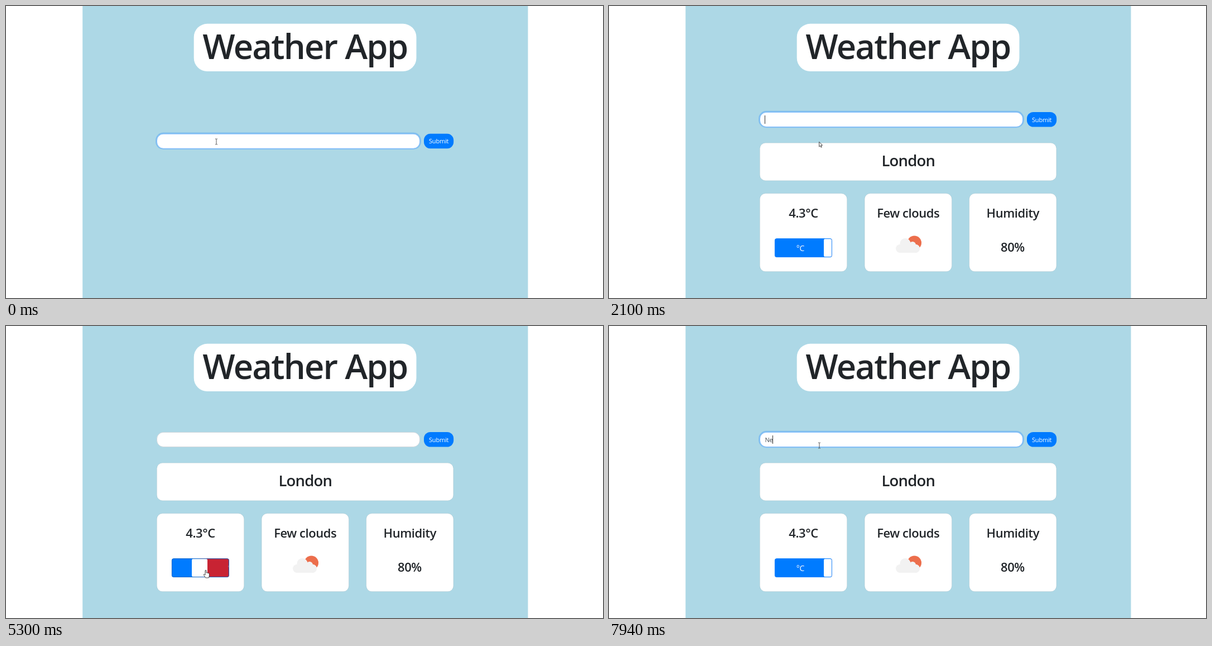
These frames come from a looping animation (1070x523 px, 7.99 s). An HTML page:

```html
<!DOCTYPE html>
<html lang="en">
<head>
<meta charset="utf-8">
<title>Weather App</title>
<style>
  html, body { margin: 0; width: 100%; height: 100%; overflow: hidden; background: #fff; }
  svg { display: block; width: 100vw; height: 100vh; }
  text { font-family: "Open Sans", "Noto Sans", sans-serif; fill: #212529; letter-spacing: -.02em; }
  .mid { text-anchor: middle; }
  .head { font-size: 22px; font-weight: 600; text-anchor: middle; }
  .light { fill: #fff; font-weight: 500; }
  .card { fill: #fff; stroke: #000; stroke-opacity: .1; stroke-width: .7; }
  .cursor { fill: #fff; stroke: #333; stroke-width: .9; stroke-linejoin: round; }
</style>
</head>
<body>
<svg viewBox="0 0 1070 523">
  <defs>
    <clipPath id="pill"><rect x="297.3" y="416.5" width="102.4" height="33.3" rx="3"/></clipPath>
  </defs>

  <rect x="137.2" width="798.3" height="523" fill="#add8e6"/>
  <rect x="336.7" y="31.8" width="398.8" height="85.2" rx="24" fill="#fff"/>
  <text class="mid" x="536" y="95" font-size="61.5" font-weight="600" style="letter-spacing:-.029em">Weather App</text>

  <g id="form">
    <rect id="ring" x="268" y="187.8" width="476" height="30.4" rx="14" fill="#82bfee"/>
    <rect id="field" x="270.5" y="190.4" width="471" height="26" rx="11.5" fill="#fff" stroke-width=".9"/>
    <text id="typed" x="279.5" y="208" font-size="11" style="fill:#495057;letter-spacing:-.03em"></text>
    <rect id="caret" y="196" width="1" height="15" fill="#333"/>
    <rect x="749" y="190" width="53.2" height="26.5" rx="11.5" fill="#007bff"/>
    <text class="mid light" x="775.6" y="207.6" font-size="11">Submit</text>
  </g>

  <g id="results">
    <rect class="card" x="270.4" y="245.3" width="531.4" height="67.4" rx="10"/>
    <rect class="card" x="270.4" y="335.8" width="156.2" height="139.8" rx="10"/>
    <rect class="card" x="458.2" y="335.8" width="156.2" height="139.8" rx="10"/>
    <rect class="card" x="645.7" y="335.8" width="156.2" height="139.8" rx="10"/>
    <text class="head" x="536.3" y="287" style="font-size:27.5px;letter-spacing:-.03em">London</text>
    <text class="head" id="temp" x="348.5" y="379"></text>
    <text class="head" x="536.3" y="379">Few clouds</text>
    <text class="head" x="723.8" y="379">Humidity</text>
    <text class="head" x="723.5" y="439.5">80%</text>

    <circle cx="547.3" cy="424.3" r="12.7" fill="#ec6e4c"/>
    <g fill="#f2f2f2">
      <rect x="514" y="427" width="43" height="15" rx="7.5"/>
      <circle cx="531" cy="425.5" r="9.6"/>
      <circle cx="544" cy="428" r="6"/>
      <circle cx="549.5" cy="434.5" r="7.3"/>
    </g>

    <g clip-path="url(#pill)">
      <g id="slider">
        <rect id="on" x="297" y="416" width="102" height="34"/>
        <rect id="off" x="399" y="416" width="103" height="34"/>
        <rect x="385" y="416.8" width="28" height="32.6" rx="3" fill="#fff"/>
        <text class="mid light" x="343" y="438.7" font-size="14">°C</text>
        <text class="mid light" x="456" y="438.7" font-size="14">°F</text>
      </g>
    </g>
    <rect id="edge" x="297.4" y="416.8" width="102" height="32.8" rx="3" fill="none" stroke-width=".9"/>
  </g>

  <g id="pointer">
    <path id="beam" d="M-2-5H-.6L0-4.4.6-5H2M0-4.4V4.4M-2 5H-.6L0 4.4.6 5H2" fill="none" stroke="#444" stroke-width=".9"/>
    <path id="arrow" class="cursor" d="M.4.4V9L2.4 7.2 3.7 10.2 5.1 9.6 3.8 6.7 6.2 6.4Z"/>
    <path id="hand" class="cursor" d="M-1 1Q0-.6 1 1V5Q2.4 4.2 3 5.3 4.4 4.7 5 5.9 6.4 5.6 6.4 7V10Q6.4 12 5.2 14H-.4Q-1.4 12-3.4 9.4-4.4 7.4-2.6 7.7L-1 9Z"/>
  </g>
</svg>
<script>
const LOOP = 7990, TRAVEL = 102;
const ui = {};
document.querySelectorAll("[id]").forEach(el => ui[el.id] = el);

const typing = [
  { word: "London", keys: [570, 800, 1030, 1120, 1210, 1390], clear: 1990 },
  { word: "Ne", keys: [7560, 7940], clear: LOOP }
];
const caretShown = [[340, 1920], [1990, 2520], [3050, 3580], [6090, 6620], [7150, LOOP]];
// pointer stops: time, x, y
const stops = [
  [0, 377, 243], [2059, 377, 243], [2060, 376.3, 243], [2900, 376.3, 243],
  [3420, 362, 444], [3600, 360, 438.5], [3760, 360, 438.5], [3900, 358, 437],
  [5500, 358, 437], [5850, 373, 223], [6060, 373.4, 214], [6490, 373.4, 214],
  [6640, 377, 214], [LOOP, 377, 214]
];

const ramp = (t, start, ms) => Math.min(1, Math.max(0, (t - start) / ms));
const mix = (a, b, k) => `rgb(${a.map((v, i) => Math.round(v + (b[i] - v) * k))})`;
const show = (el, yes) => el.setAttribute("visibility", yes ? "visible" : "hidden");
const shift = (el, x, y) => el.setAttribute("transform", `translate(${x} ${y})`);

// cubic-bezier(.25, .1, .25, 1)
function ease(x) {
  const curve = (s, a, b) => 3 * (1 - s) * s * ((1 - s) * a + s * b) + s ** 3;
  let lo = 0, hi = 1;
  for (let i = 0; i < 20; i++) {
    const s = (lo + hi) / 2;
    if (curve(s, .25, .25) < x) lo = s; else hi = s;
  }
  return curve(lo, .1, 1);
}
const fade = (t, start) => ease(ramp(t, start, 150));

function pointerAt(t) {
  const i = Math.max(1, stops.findIndex(s => s[0] > t));
  const [a, b] = [stops[i - 1], stops[i]];
  const k = ramp(t, a[0], b[0] - a[0]), e = k * k * (3 - 2 * k);
  return [a[1] + (b[1] - a[1]) * e, a[2] + (b[2] - a[2]) * e];
}

function drawForm(t) {
  shift(ui.form, 0, t < 2100 ? 38.8 : 0);
  const focus = 1 - fade(t, 3750) + fade(t, 6090);
  ui.ring.setAttribute("opacity", focus);
  ui.field.setAttribute("stroke", mix([206, 212, 218], [128, 189, 255], focus));
  ui.typed.textContent = typing
    .map(({ word, keys, clear }) => t < clear ? word.slice(0, keys.filter(k => k <= t).length) : "")
    .join("");
  const width = ui.typed.textContent ? ui.typed.getComputedTextLength() : 0;
  ui.caret.setAttribute("x", Math.floor(279.5 + width));
  show(ui.caret, caretShown.some(([from, to]) => t >= from && t < to));
}

function drawToggle(t) {
  const slide = ease(ramp(t, 3900, 350)) - ease(ramp(t, 5200, 350));
  shift(ui.slider, -TRAVEL * slide, 0);
  const hoverOn = fade(t, 3300) - fade(t, 3990) + fade(t, 5390) - fade(t, 5580);
  const hoverOff = fade(t, 3990) - fade(t, 5390);
  ui.on.setAttribute("fill", mix([0, 123, 255], [0, 105, 217], hoverOn));
  ui.off.setAttribute("fill", mix([220, 53, 69], [200, 35, 51], hoverOff));
  const fahrenheit = t >= 3900 && t < 5200;
  const hover = fade(t, 3300) - fade(t, 5580);
  ui.edge.setAttribute("stroke", fahrenheit ? "#bd2130" : mix([0, 123, 255], [0, 92, 191], hover));
  ui.temp.textContent = fahrenheit ? "39.7°F" : "4.3°C";
}

function drawPointer(t) {
  const [x, y] = pointerAt(t);
  const shape = t < 2060 || t >= 5900 ? "beam" : y > 416 ? "hand" : "arrow";
  for (const name of ["beam", "arrow", "hand"]) show(ui[name], name === shape);
  shift(ui.pointer, x, y);
}

const begin = performance.now();
function frame() {
  const t = (performance.now() - begin) % LOOP;
  show(ui.results, t >= 2100);
  drawForm(t);
  drawToggle(t);
  drawPointer(t);
  requestAnimationFrame(frame);
}
frame();
</script>
</body>
</html>
```
